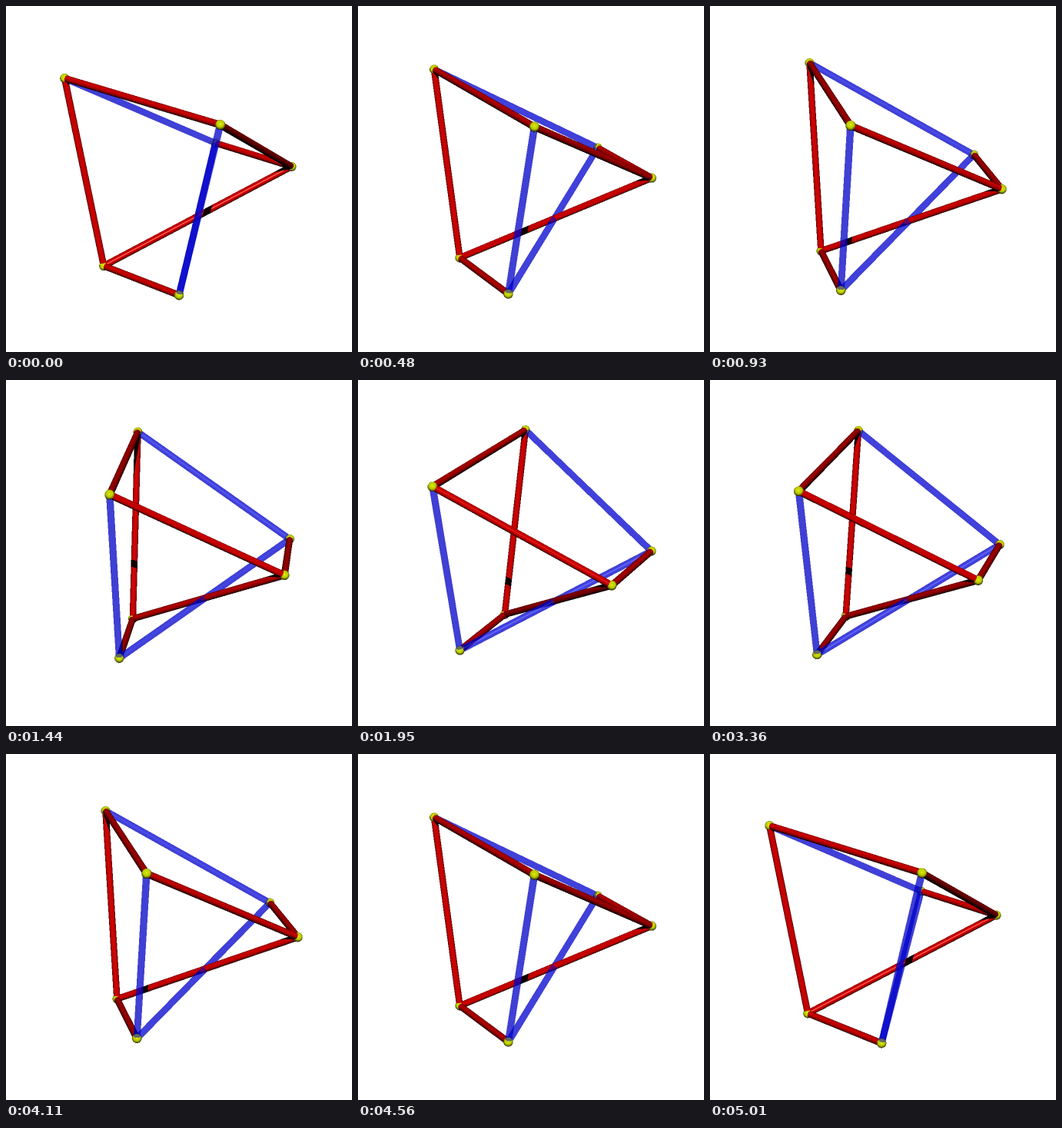
An HTML page with a canvas for the animation above (5040 ms loop, 450x450 px).

```html
<!DOCTYPE html>
<html lang="en">
<head>
<meta charset="utf-8">
<title>Swinging linkage</title>
<style>
  html, body { margin: 0; width: 100%; height: 100%; overflow: hidden; background: #fff; }
  canvas { display: block; width: 450px; height: 450px; }
</style>
</head>
<body>
<canvas id="stage" width="450" height="450"></canvas>
<script>
const SIZE = 450, SCALE = 2, N = SIZE * SCALE;
const STEP_MS = 30, STEPS = 168;
const rad = deg => deg * Math.PI / 180;

// Camera and light; camera space is x right, y up, z towards the viewer.
const EYE = 2500, UNIT = 70.3;
const TILT_SIN = 0.332, TILT_COS = Math.sqrt(1 - TILT_SIN ** 2);
const START = rad(135), TURN = rad(90 / 85);
const LIGHT = rad(16), GAIN = 1.25, GLOSS = 120;
const LY = Math.sin(LIGHT), LZ = Math.cos(LIGHT);
const HY = Math.sin(LIGHT / 2), HZ = Math.cos(LIGHT / 2);

const H = Math.sqrt(3);
const POINTS = [[1, 2, H], [1, -2, H], [-2, 1, 0], [-2, -1, 0], [1, 1, -H], [1, -1, -H]];
const RED_EDGES = [[0, 1], [0, 4], [1, 3], [2, 3], [3, 4], [4, 5]];
const BLUE_EDGES = [[0, 2], [1, 5], [2, 5]];
const RED = { rgb: [198, 0, 0], ambient: 0.03, shine: 150 };
const YELLOW = { rgb: [198, 214, 0], ambient: 0.08, shine: 60 };
const BLUE = { rgb: [0, 0, 208], ambient: 0.85, shine: 110 };
const TUBE_R = 4.4, BALL_R = 6.1;

const stage = document.getElementById('stage').getContext('2d');
const buffer = document.createElement('canvas');
buffer.width = buffer.height = N;
const bufferCtx = buffer.getContext('2d');
const image = bufferCtx.createImageData(N, N);
const pixels = image.data;
const words = new Uint32Array(pixels.buffer);
const depth = new Float64Array(N * N);

function place([along, across, height], angle) {
  const c = Math.cos(angle), s = Math.sin(angle);
  const z = along * s + across * c;
  return [
    UNIT * (along * c - across * s),
    UNIT * (height * TILT_COS - z * TILT_SIN),
    UNIT * (height * TILT_SIN + z * TILT_COS)
  ];
}

function project([x, y, z]) {
  const k = EYE / (EYE - z);
  return [(SIZE / 2 + x * k) * SCALE, (SIZE / 2 - y * k) * SCALE];
}

// A tube from a to b; a ball is a tube of no length.
function solid(a, b, r, paint) {
  const v = b.map((n, i) => n - a[i]);
  const len = Math.hypot(...v);
  const d = len ? v.map(n => n / len) : [0, 0, 0];
  const dv = d[1] * LZ - d[2] * LY;
  return {
    a, d, len, r, paint, p: project(a), q: project(b),
    // position and direction as seen from the light
    u: a[0], v: a[1] * LZ - a[2] * LY, w: a[1] * LY + a[2] * LZ,
    du: d[0], dv, dw: d[1] * LY + d[2] * LZ, flat: d[0] ** 2 + dv ** 2
  };
}

function inShadow(x, y, z, self, casters) {
  const v = y * LZ - z * LY, w = y * LY + z * LZ;
  for (const c of casters) {
    if (c === self) continue;
    const eu = x - c.u, ev = v - c.v;
    const cross = eu * c.dv - ev * c.du;
    if (cross * cross > c.r * c.r * c.flat) continue;
    const t = (eu * c.du + ev * c.dv) / c.flat;
    if (t > 0 && t < c.len && c.w + t * c.dw > w + 3) return true;
  }
  return false;
}

// Side -1 is the near surface, 1 the far one.
function trace(s, side, alpha, casters) {
  const { a, d, len, r, p, q, paint } = s;
  const m = [-a[0], -a[1], EYE - a[2]];
  const md = m[0] * d[0] + m[1] * d[1] + m[2] * d[2];
  const cc = m[0] ** 2 + m[1] ** 2 + m[2] ** 2 - md * md - r * r;
  const pad = (r * 1.1 + 1.5) * SCALE;
  const dx = q[0] - p[0], dy = q[1] - p[1];
  const rise = Math.abs(dy) / (Math.hypot(dx, dy) || 1);
  const left = Math.min(p[0], q[0]) - pad, right = Math.max(p[0], q[0]) + pad;
  const top = Math.floor(Math.min(p[1], q[1]) - pad);
  const bottom = Math.max(p[1], q[1]) + pad;

  for (let row = top; row <= bottom; row++) {
    let from = left, to = right;
    if (rise > 0.01) {
      const mid = p[0] + (row - p[1]) * dx / dy;
      from = Math.max(from, mid - pad / rise);
      to = Math.min(to, mid + pad / rise);
    }
    const ry = SIZE / 2 - (row + 0.5) / SCALE;
    for (let col = Math.floor(from); col <= to; col++) {
      const rx = (col + 0.5) / SCALE - SIZE / 2;
      const rd = rx * d[0] + ry * d[1] - EYE * d[2];
      const aa = rx * rx + ry * ry + EYE * EYE - rd * rd;
      const bb = m[0] * rx + m[1] * ry - m[2] * EYE - md * rd;
      const disc = bb * bb - aa * cc;
      if (disc < 0) continue;
      const t = (-bb + side * Math.sqrt(disc)) / aa;
      const axial = md + t * rd;
      const at = row * N + col;
      if (t >= depth[at] || axial < 0 || axial > len) continue;

      const x = rx * t, y = ry * t, z = EYE - EYE * t;
      const ny = -side * (y - a[1] - axial * d[1]) / r;
      const nz = -side * (z - a[2] - axial * d[2]) / r;
      let diffuse = Math.min(1, GAIN * Math.max(0, ny * LY + nz * LZ));
      let shine = paint.shine * Math.pow(Math.max(0, ny * HY + nz * HZ), GLOSS);
      if (alpha === 1) {
        depth[at] = t;
        if (diffuse > 0 && inShadow(x, y, z, s, casters)) {
          diffuse *= 0.05;
          shine = 0;
        }
      }
      const light = paint.ambient + (1 - paint.ambient) * diffuse;
      for (let i = 0; i < 3; i++) {
        const tone = paint.rgb[i] * light + shine;
        pixels[at * 4 + i] = pixels[at * 4 + i] * (1 - alpha) + tone * alpha;
      }
    }
  }
}

function draw(step) {
  const swing = Math.min(step, STEPS - step);
  const pts = POINTS.map(p => place(p, START + TURN * swing));
  const tubes = (edges, paint) => edges.map(([i, j]) => solid(pts[i], pts[j], TUBE_R, paint));
  const reds = tubes(RED_EDGES, RED);
  const blues = tubes(BLUE_EDGES, BLUE);
  const balls = pts.map(p => solid(p, p, BALL_R, YELLOW));
  const casters = [...reds, ...blues];

  words.fill(0xffffffff);
  depth.fill(Infinity);
  for (const s of [...balls, ...reds]) trace(s, -1, 1, casters);

  blues.sort((s, t) => (s.a[2] + s.d[2] * s.len / 2) - (t.a[2] + t.d[2] * t.len / 2));
  for (const s of blues) {
    trace(s, 1, 0.5);
    trace(s, -1, 0.5);
  }
  bufferCtx.putImageData(image, 0, 0);
  stage.drawImage(buffer, 0, 0, SIZE, SIZE);
}

const begin = performance.now();
let shown = -1;
function tick() {
  const step = Math.floor((performance.now() - begin) / STEP_MS) % STEPS;
  if (step !== shown) draw(shown = step);
  requestAnimationFrame(tick);
}
tick();
</script>
</body>
</html>
```
